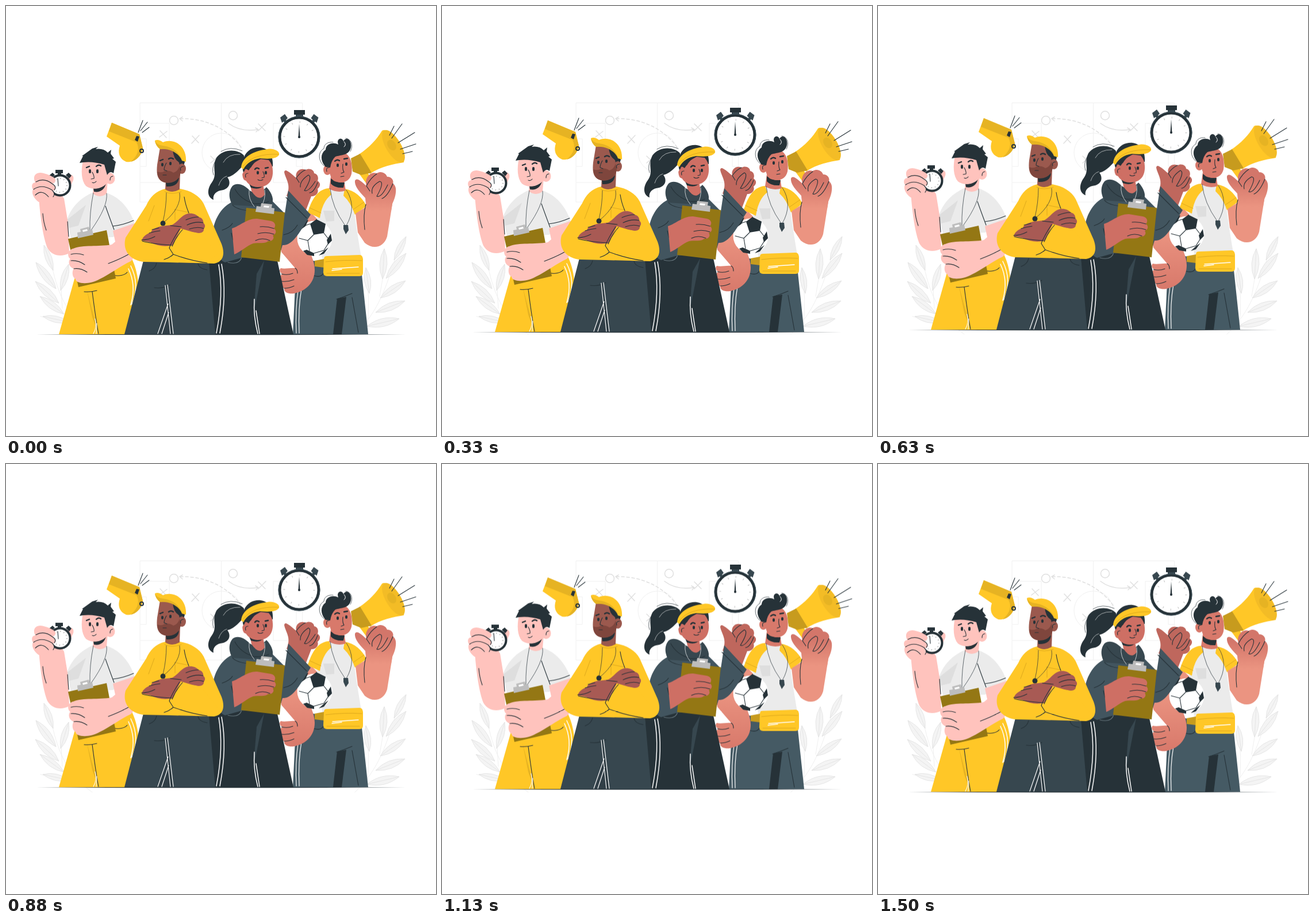
Recreate the animation shown at these times as an HTML page. Size 748 px wide and 748 px high, loop 1540 ms.

```html
<!DOCTYPE html>
<html lang="en">
<head>
<meta charset="utf-8">
<title>Coaching team</title>
<style>
html, body { margin: 0; width: 100%; height: 100%; overflow: hidden; background: #fff; }
svg { display: block; width: 100%; height: 100%; }
.crew { animation: float 1540ms linear 20ms infinite; }
@keyframes float { 50% { transform: translateY(-10px); } }
.ln, .wh, .bg, .fold { fill: none; stroke-linecap: round; stroke-linejoin: round; }
.ln { stroke: #263238; stroke-width: 1.1; }
.wh { stroke: #fff; stroke-width: 1.5; }
.bg { stroke: #f0f0f0; stroke-width: 1; }
.fold { stroke: #dba61c; stroke-width: .9; }
.cord { stroke-width: .7; }
.eye { stroke-width: 4; }
.brow { stroke-width: 2.4; }
.mark { stroke: #e0e0e0; stroke-width: 1.5; }
.y { fill: #ffc727; } .yd { fill: #e6b323; } .yk { fill: #c79b1e; }
.k { fill: #263238; } .s { fill: #37474f; } .b { fill: #455a64; } .h { fill: #42555f; }
.t { fill: #ebebeb; } .td { fill: #dedede; } .w { fill: #fff; }
.pad { fill: #947714; } .clip { fill: #bdbdbd; }
.p1 { fill: #ffc3bd; } .p2 { fill: #9b594e; } .p2d { fill: #7f463d; } .p2h { fill: #a85a54; }
.p3 { fill: #ce6f64; } .p3d { fill: #bf675d; } .p4 { fill: #eb9481; } .p4d { fill: #d8796b; }
.leaf { fill: #f4f4f4; stroke: #e4e4e4; stroke-width: .9; }
</style>
</head>
<body>
<svg viewBox="0 0 748 748">
  <defs>
    <linearGradient id="fist" x2="0" y2="1">
      <stop offset=".3" stop-color="#d3766a"/><stop offset="1" stop-color="#eb9481"/>
    </linearGradient>
    <linearGradient id="palm" x2="0" y2="1">
      <stop offset=".3" stop-color="#eb9481"/><stop offset="1" stop-color="#d8796b"/>
    </linearGradient>
  </defs>

  <!-- tactics board -->
  <g class="bg">
    <path d="M233.500 168.500H515.500V341H233.500ZM374.500 168.500V341M234 204H284V307H234M234 231H244V279H234M515.500 204H465V307H515.500M515.500 231H505V279H515.500"/>
    <circle cx="375" cy="255" r="34"/>
    <g class="mark">
      <circle cx="292" cy="199" r="7.500"/><circle cx="395" cy="190.500" r="7.500"/>
      <path d="M324 226l11 12m1-13l-13 14M439 205l12 12m1-13l-13 13M268 217l11 12m1-11l-13 10M356 261l12 12m1-11l-13 11"/>
      <path d="M303 196C350 195 387 215 410 247" stroke-dasharray="5 4"/>
      <path d="M307 193L302 196L307 200M387 204C400 214 418 218 438 215M434 212L439 215L435 219"/>
    </g>
  </g>

  <g id="plants"></g>

  <g class="crew">
    <path class="k" d="M52 571.500Q374 570 696 571.500Q374 573 52 571.500Z"/>

    <!-- whistle -->
    <path class="y" d="M184 203L232 223L238 247C235 263 222 273 209 271C197 266 194 255 198 243L175 227Z"/>
    <path class="yd" d="M184 203L232 223L227 237L179 218Z"/>
    <path class="yd" d="M232 223L238 247C236 261 226 269 217 271C230 260 233 248 227 237Z"/>
    <path class="k" d="M227 226L232 227L229 236L224 233Z"/>
    <circle class="ln" cx="236" cy="252" r="3" style="stroke-width:2"/>
    <path class="ln" d="M230 220L238 199M234 217L246 202M237 220L249 211"/>

    <!-- large stopwatch -->
    <path class="s" d="M504 187h13v8h-13Z"/>
    <path class="k" d="M501 181h19v8h-19Z"/>
    <path id="knob" class="s" d="M477 194l8-6 5 7-3 3 4 5-4 3-4-5-3 2Z"/>
    <use href="#knob" transform="matrix(-1 0 0 1 1020.500 0)"/>
    <circle class="w" cx="510" cy="228" r="34" stroke="#263238" stroke-width="5"/>
    <circle cx="510" cy="228" r="36" fill="none" stroke="#455a64" stroke-width=".8"/>
    <circle cx="510" cy="228" r="26" fill="none" stroke="#bbb" stroke-width="3" stroke-dasharray="1 12.614"/>
    <path class="k" d="M510 205L511.500 229L508.500 229Z"/><circle class="k" cx="510" cy="228" r="2"/>

    <!-- first coach -->
    <path class="y" d="M121 468L92 571H217L231 500C231 470 224 450 219 440Z"/>
    <path class="yd" d="M140 491L161 571L150 541Z"/>
    <path class="ln" d="M136 497C144 498 150 497 158 495M150 497C153 520 157 550 161 570M187 468C196 471 207 468 211 463"/>
    <path class="wh" d="M213 457C224 480 223 500 217 520M217 452C230 478 227 500 219 519"/>
    <path class="wh" d="M155 544Q159 558 152 570M158 552L157 570" style="stroke-width:1.1"/>
    <path class="t" d="M152 324C130 333 113 350 106 372L113 405L186 402L224 380C216 352 196 331 174 325Z"/>
    <path class="td" d="M139 346L106 372L110 386L126 382Z"/>
    <path class="p1" d="M152 312L177 303L175 326C168 333 157 332 151 326Z"/>
    <path class="k" d="M152 317C160 319 169 315 174 309C171 320 163 325 153 323Z"/>
    <path class="p1" d="M134 268C130 287 131 304 139 313C149 321 168 319 177 306L181 270Z"/>
    <ellipse class="p1" cx="181" cy="300" rx="8.500" ry="10"/>
    <path class="k" d="M128 273L134 261L132 261L150 248L160 245L156 249Q169 247 177 255L183 250L182 257L188 265L185 266L191 271L187 291Q181 286 176 294L171 276Q152 270 134 272Z"/>
    <path class="ln eye" d="M146 286v3M159 286v3"/>
    <path class="ln brow" d="M140 281L145 279M157 279Q161 275 165 278"/>
    <path class="ln" d="M150 289Q154 296 153 300L148 301M150 307Q154 309 157 305M181 303Q181 296 186 296"/>
    <path class="ln cord" d="M152 325Q145 360 146 391M175 326Q178 348 148 390"/>
    <path class="ln" d="M173 348Q179 365 188 389M186 383Q204 381 222 373"/>
    <path class="p1" d="M57 333C60 372 65 404 72 421C80 435 96 437 110 430L108 378L101 335L85 312Z"/>
    <path class="ln" d="M64 361Q65 376 70 390M107 375L109 401"/>
    <path class="p1" d="M108 295C114 291 119 296 117 303L108 322Z"/>
    <path class="k" d="M86 285h13v6h-13ZM90 290h6v7h-6ZM75 295l6-5 4 4-6 5ZM104 294l5-4 5 5-4 5Z"/>
    <circle class="w" cx="94" cy="312" r="17.500" stroke="#263238" stroke-width="4"/>
    <path class="ln" d="M90 300L91 313"/>
    <circle cx="94" cy="312" r="12" fill="none" stroke="#999" stroke-width="2" stroke-dasharray="1 5.280"/>
    <path class="p1" d="M57 341C47 334 44 324 47 319C43 313 46 307 51 307C46 298 50 290 60 290C70 291 80 296 84 299C89 303 84 310 80 309C90 314 87 322 81 321C86 328 82 334 75 332C73 338 66 341 57 341Z"/>
    <path class="ln" d="M52 306Q66 298 80 309Q89 314 84 320M48 319Q62 309 80 320Q87 327 82 332M51 329Q62 318 74 332"/>
    <path class="pad" d="M108 405L175 390L191 474L126 489Z"/>
    <path class="clip" d="M124 394L130 393L129 388L144 384L146 390L150 389L152 398L125 404Z"/>
    <path class="w" d="M133 390L141 388L142 391L134 393Z"/>
    <path class="p1" d="M186 391L224 378C231 401 228 435 217 444C201 451 180 467 163 475C144 486 121 483 121 475C114 471 115 460 118 457C108 454 108 442 112 440C105 435 108 424 117 422C134 415 161 419 184 415L190 410Z"/>
    <path class="ln" d="M113 432Q124 429 135 433M113 443Q126 442 137 450M118 457Q129 455 141 463M178 448Q199 440 213 432"/>

    <!-- fourth coach -->
    <path class="b" d="M503 488Q526 466 534 443L618 458L630 571H499Z"/>
    <path class="k" d="M576 509L592 506L584 571H569Z"/>
    <path class="ln" d="M575 510Q588 506 602 500M535 469Q548 473 552 465M602 507L613 568"/>
    <path class="wh" d="M508 495Q503 530 505 569M514 492Q508 526 510 569" style="stroke-width:1.2"/>
    <path fill="url(#palm)" d="M526 355L512 390L476 410L479 428L503 456C495 455 485 458 478 456C474 460 477 464 481 466C474 471 474 477 480 480C476 487 479 491 484 491C483 498 491 501 501 500C522 496 537 481 537 459C537 438 522 418 516 399L546 375Z"/>
    <path class="ln" d="M479 466Q489 469 499 465M480 479Q491 480 501 476M484 491Q493 491 501 487M503 456Q507 458 507 465"/>
    <path class="t" d="M562 317L548 348L536 385L551 442L618 437Q610 390 606 358L592 320Z"/>
    <path class="y" d="M562 317C543 318 532 335 525 359L546 369Q550 340 566 328ZM589 318C607 321 620 333 627 348L607 363Q600 342 587 330Z"/>
    <path class="td" d="M552 356L571 356L571 374L557 375Z"/>
    <path class="fold" d="M528 351L548 360M604 354L623 341"/>
    <path class="p4d" d="M565 297L588 303L591 321Q577 326 562 318Z"/>
    <path class="k" d="M565 300Q575 308 589 307L587 316Q572 317 565 309Z"/>
    <path class="p4d" d="M562 262L592 257C601 264 603 279 601 292C597 309 580 309 570 304C562 297 561 282 562 262Z"/>
    <ellipse class="p4d" cx="559" cy="285" rx="7" ry="9"/>
    <path class="k" d="M556 280C546 269 547 256 556 250C556 240 569 236 578 241C574 231 584 227 587 235C593 225 604 236 599 249C595 260 582 259 573 262Q566 268 564 281Z"/>
    <path class="ln cord" d="M553 278C542 268 543 253 553 248C553 239 562 236 569 237M591 230C600 231 605 242 599 253"/>
    <path class="wh" d="M588 236Q593 241 588 245" style="stroke-width:1"/>
    <path class="ln eye" d="M577 276v2M592 274v2"/>
    <path class="ln brow" d="M572 270Q576 266 580 269M588 266L594 265"/>
    <path class="ln" d="M586 275Q585 285 588 289L583 291M582 297L588 296M558 288Q556 281 562 281"/>
    <path class="ln cord" d="M564 318Q567 350 590 382M592 320Q611 349 592 382"/>
    <path class="s" d="M587 381h8l1 9-5 7-4-9Z"/>
    <circle class="w" cx="537" cy="404" r="30.500"/>
    <path class="k" d="M529 379L540 371L556 379L553 395L535 398ZM512 382L519 374L526 372L521 383L510 391ZM565 396L567 408L560 415L558 407ZM523 424L536 430L536 435L524 433L517 426ZM554 425L561 420L553 431L544 434Z"/>
    <path class="ln" d="M529 379L520 382M535 398L525 408L528 426M553 395L560 404M525 408L510 404M536 430L553 425L560 414M540 371V373"/>
    <path class="yk" d="M537 443L553 440V455L537 453Z"/>
    <path class="y" d="M558 435L615 433Q620 433 621 440L621 464Q621 470 614 470L559 470Q552 470 552 463L553 440Q553 435 558 435Z"/>
    <path class="fold" d="M556 445Q589 441 619 443M558 465L615 465"/>
    <path class="wh" d="M568 457L613 454M567 460L584 458" style="stroke-width:1.3"/>

    <!-- megaphone -->
    <path class="y" d="M613 290L627 286L635 300L627 309Z"/>
    <path class="y" d="M614 258C631 247 645 232 654 217C667 207 697 256 692 272C674 275 652 279 633 292Z"/>
    <ellipse cx="674" cy="244" rx="13" ry="32" transform="rotate(-31 674 244)" fill="#f3bc26"/>
    <ellipse class="yd" cx="671" cy="242" rx="7" ry="10" transform="rotate(-31 671 242)"/>
    <path class="yk" d="M600 265L616 257L636 290L618 294L603 288Z"/>
    <path class="ln" d="M667 225L675 209M671 230L689 205M682 238L711 220M686 249L713 240M690 257L707 253"/>
    <path class="p4" d="M608 361L627 349L625 330L674 332L663 401C657 421 638 424 624 412L612 394Z"/>
    <path fill="url(#fist)" d="M625 334C618 326 606 315 607 304C610 297 619 306 627 313C623 299 634 287 645 291C653 286 661 291 663 297C672 297 675 305 673 309C682 314 678 333 672 344L670 356L627 356Z"/>
    <path class="ln" d="M627 313Q634 299 645 292M637 326Q634 314 650 305Q659 306 645 331Q653 334 664 311M654 335Q664 331 673 309M626 345Q621 363 624 389M627 313L633 322"/>

    <!-- third coach -->
    <path class="k" d="M352 440L362 571H500L470 434Z"/>
    <path class="s" d="M436 466L449 443L430 540Z"/>
    <path class="ln" d="M386 446Q406 451 410 437" style="stroke:#66757c"/>
    <path class="wh" d="M370 450Q379 501 366 569M375 449Q385 501 372 569M432 510Q430 540 438 570M435 530L441 570"/>
    <path class="p3d" d="M484 289C485 281 494 290 505 299C502 288 512 281 521 285C528 281 536 285 536 291C543 292 544 300 542 304C549 309 546 315 542 318C545 326 537 332 531 331L520 360L488 330C497 311 486 301 484 289Z"/>
    <path class="ln" d="M505 299Q512 289 521 285M512 315Q511 304 526 294Q534 297 519 321Q526 324 538 305M528 325Q536 324 542 307M505 299L510 307"/>
    <path class="h" d="M393 341C373 351 361 373 359 398C360 425 370 442 381 446L410 438L475 436L481 416C500 417 512 391 530 363L491 321L485 361L461 337Z"/>
    <path class="s" d="M394 313C402 306 415 311 424 321C433 327 444 325 453 315C463 325 467 338 462 345L438 349L394 346C386 333 388 320 394 313Z"/>
    <path class="ln" d="M398 318Q408 337 432 344Q446 345 457 340M394 346Q401 354 422 356M376 390Q390 385 394 378M487 333L523 369M392 395L395 407M483 398Q499 395 507 381"/>
    <path class="p3" d="M423 300L447 308L450 328Q440 342 427 322Z"/>
    <path class="k" d="M421 305Q432 315 449 311Q442 321 426 316Z"/>
    <path class="k" d="M414 260C402 247 376 249 366 264C357 282 369 292 358 307C349 319 350 333 361 337C359 328 366 321 378 320C393 315 389 302 385 298C400 294 407 282 414 276Z"/>
    <path class="wh" d="M407 258Q386 257 378 272M384 296Q374 299 370 312" style="stroke-width:.6"/>
    <path class="ln cord" d="M411 252Q390 243 374 253M364 270Q357 282 361 294"/>
    <path class="k" d="M413 290C407 265 419 244 443 246C458 248 465 261 464 279L430 285Z"/>
    <path class="p3" d="M416 284C411 297 418 314 438 315C458 315 465 302 464 286Q464 276 457 268L441 266Q431 272 426 281Z"/>
    <ellipse class="p3" cx="418" cy="295" rx="7" ry="9"/>
    <path class="k" d="M411 279Q425 266 445 265L431 273L422 286Z"/>
    <path class="y" d="M409 281C411 263 429 252 455 249C466 247 477 253 475 259C470 267 454 266 442 265C428 267 419 273 413 284Z"/>
    <path class="fold" d="M413 278Q430 256 474 258"/>
    <path class="ln eye" d="M438 289v2M452 289v2"/>
    <path class="ln brow" d="M433 284Q436 280 440 283M451 282L456 281"/>
    <path class="ln" d="M447 288Q450 294 449 298L445 299M438 302Q442 305 447 302M417 298Q415 291 421 291"/>
    <path class="wh" d="M410 290Q412 308 423 315" style="stroke-width:.8"/>
    <path class="wh" d="M423 320Q421 336 432 349M450 320Q452 337 444 348" style="stroke-width:.7"/>
    <path class="pad" d="M418 351L485 359L476 445L409 437Z"/>
    <path class="clip" d="M436 348L443 349L444 343L463 345L462 351L467 352L466 362L434 358Z"/>
    <path class="w" d="M449 347L458 348L457 351L448 350Z"/>
    <path class="p3" d="M393 387C408 382 420 369 437 370L461 374C469 376 470 383 466 387C472 391 469 398 464 399C468 404 463 410 456 409C451 414 440 411 430 413C417 418 408 428 397 432Z"/>
    <path class="ln" d="M442 384Q454 383 466 387M438 396Q453 392 466 397M434 408Q446 402 459 408"/>

    <!-- second coach -->
    <path class="s" d="M239 443L206 571H364L353 445Z"/>
    <path class="k" d="M278 480L283 510L263 571H290Z" opacity=".35"/>
    <path class="ln" d="M258 490Q273 492 285 485M278 487L289 570M262 447Q260 457 249 461M334 448Q336 457 350 459"/>
    <path class="wh" d="M277 486L286 570M281 485L291 570M282 518L264 570M283 533L271 570" style="stroke-width:1.2"/>
    <path class="y" d="M277 318C260 322 250 333 244 347L208 403C202 426 216 442 239 445L285 446L362 448C379 445 381 430 375 414L344 344C337 330 321 321 303 318Z"/>
    <path class="p2" d="M278 300L303 292L302 319Q289 327 277 319Z"/>
    <path class="k" d="M278 307Q292 307 301 298Q300 315 279 314Z"/>
    <path class="k" d="M271 249C288 239 308 251 311 271L306 290L296 286Z"/>
    <path class="p2" d="M268 246L263 276C261 295 264 304 277 307C295 309 304 298 304 286L301 272Q291 266 290 250Q279 244 268 246Z"/>
    <ellipse class="p2" cx="306" cy="283" rx="7" ry="9"/>
    <path class="p2d" d="M263 288Q271 291 276 287Q285 285 291 290Q299 288 302 278L304 289C302 302 291 310 276 307Q264 304 263 288Z"/>
    <path class="y" d="M259 234Q265 231 273 237C292 229 315 243 313 271L306 269C301 251 282 247 268 249Q260 243 259 234Z"/>
    <path class="yd" d="M259 234Q262 242 273 243C289 245 301 253 306 269C300 254 282 247 268 249Q260 243 259 234Z"/>
    <path class="ln eye" d="M272 275v2M286 273v2"/>
    <path class="ln brow" d="M268 269L273 267M283 266Q287 263 291 266"/>
    <path class="ln" d="M279 273Q275 280 275 285L280 287M273 294L279 294M304 286Q302 279 309 279"/>
    <path class="fold" d="M276 323Q288 329 305 323M293 354L318 359V373M294 354V372M258 347L248 374"/>
    <path class="ln cord" d="M279 325Q279 350 273 375M302 325Q306 350 275 376"/>
    <path class="ln" d="M310 332Q312 346 318 360"/>
    <circle class="k" cx="273" cy="378" r="4.500"/>
    <path class="p2h" d="M236 408C239 399 246 396 252 394C253 388 263 385 270 383L296 380L308 389L291 416Q270 421 251 411Z"/>
    <path class="p2h" d="M286 382C299 377 305 363 317 361C325 360 332 363 335 367C341 368 344 373 343 377C348 381 346 386 344 387C345 395 337 396 330 394L305 391Z"/>
    <path class="ln" d="M236 407Q248 407 259 401M249 395Q259 392 268 391M254 389L266 386M313 372Q325 367 335 367M315 381Q329 374 343 377M319 388Q333 383 344 387M286 382L305 384"/>
    <path class="y" d="M304 387L287 421L283 432L349 446L368 432L341 398Z"/>
    <path class="ln" d="M307 389Q296 401 289 418M302 388Q289 408 284 421L291 432M237 409Q254 414 288 416M275 441Q285 438 291 432Q321 443 350 447"/>
  </g>
</svg>
<script>
const NS = "http://www.w3.org/2000/svg";
const plants = document.getElementById("plants");

function add(d, cls) {
  const path = document.createElementNS(NS, "path");
  path.setAttribute("d", d);
  path.setAttribute("class", cls);
  plants.append(path);
}

// Pointed leaf from tip to base with a midrib.
function leaf([x1, y1, x2, y2]) {
  const mx = (x1 + x2) / 2, my = (y1 + y2) / 2;
  const nx = (y2 - y1) * 0.24, ny = (x1 - x2) * 0.24;
  add(`M${x1} ${y1}Q${mx + nx} ${my + ny} ${x2} ${y2}Q${mx - nx} ${my - ny} ${x1} ${y1}ZL${x2} ${y2}`, "leaf");
}

add("M77 440C86 480 96 533 150 571M96 494L98 526M60 540L112 552", "bg");
add("M677 439C662 485 650 530 607 571M655 475L650 505M625 460Q635 510 628 555", "bg");
[
  [66, 416, 82, 460], [52, 446, 87, 492], [51, 479, 92, 517], [59, 505, 101, 536],
  [64, 540, 110, 550], [109, 449, 95, 495], [696, 401, 675, 442], [658, 422, 655, 475],
  [696, 430, 661, 474], [695, 478, 651, 508], [694, 513, 643, 533], [684, 544, 628, 557],
  [626, 455, 632, 500]
].forEach(leaf);
</script>
</body>
</html>
```
